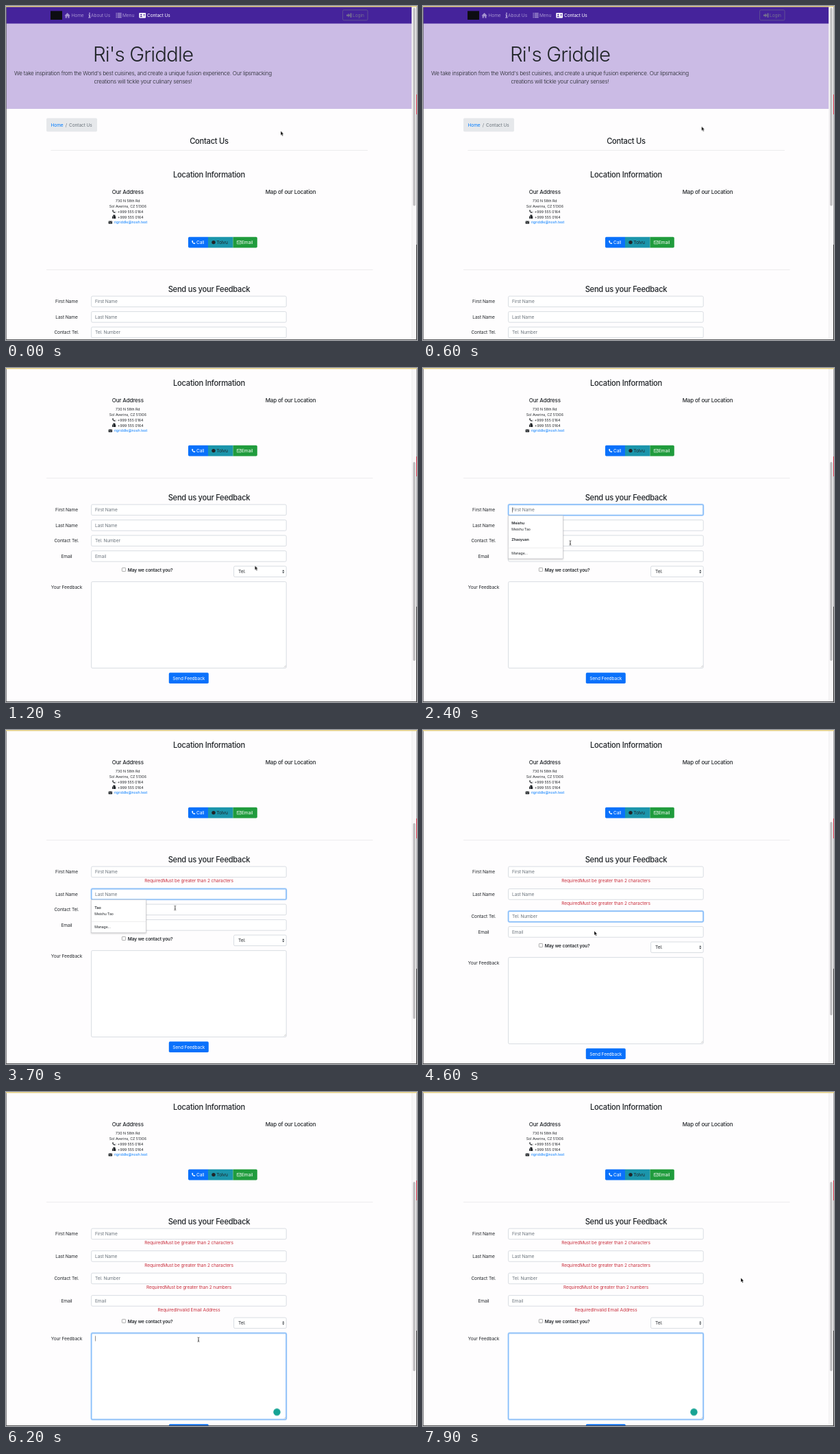
These frames come from a looping animation (600 by 487 pixels, 8000 ms). An HTML page:

```html
<!DOCTYPE html>
<html lang="en">
<head>
<meta charset="utf-8">
<title>Contact form</title>
<style>
html, body { margin: 0; width: 100%; height: 100%; overflow: hidden; background: #fefdfe; }
svg { display: block; width: 600px; height: 487px; }
text { font: 6.6px Inter, Roboto, sans-serif; letter-spacing: -.015em; fill: #212529; white-space: pre; }
.mid { text-anchor: middle; }
.title { font-size: 29.5px; font-weight: 300; letter-spacing: -.03em; }
.lead { font-size: 8.1px; font-weight: 300; letter-spacing: -.03em; }
.h3 { font-size: 11.2px; font-weight: 500; letter-spacing: -.025em; }
.h5 { font-size: 8px; font-weight: 500; letter-spacing: -.02em; }
.small { font-size: 5.25px; letter-spacing: 0; }
.pick { font-size: 5.4px; font-weight: 600; }
.sub { font-size: 5.2px; }
.bold { font-weight: 600; }
.white { fill: #fff; }
.link { fill: #007bff; }
.muted, .hint { fill: #6c757d; }
.nav { fill: #a593d0; }
.login { fill: #75708f; }
.error { fill: #c9303e; text-anchor: middle; }
.line { stroke: #e4e4e6; stroke-width: .7; }
.field, .ring, .glow { x: 124.6px; y: -7.8px; width: 284.6px; height: 15.6px; rx: 1.7px; }
.field, .select { fill: #fff; stroke: #c9cfd6; stroke-width: .7; }
.ring { fill: none; stroke: #80bdff; stroke-width: .8; }
.glow { fill: none; stroke: #007bff; stroke-opacity: .3; stroke-width: 2.2; }
.area { height: 126px; }
.caret { stroke: #444; stroke-width: .6; animation: blink 1s step-end infinite; }
.menu { fill: #fff; stroke: #c4c4c8; stroke-width: .6; filter: drop-shadow(0 1px 1.2px #0003); }

.scroll, .thumb, .s1, .s2, .s3, .s4, .e1, .e2, .e3, .e4, .m1, .m2, .badge, .arrow, .beam {
  animation: 8s step-end infinite;
}
.focus { animation: 8s linear infinite; }
.cursor { animation: move 8s ease-in-out infinite; }
.scroll { animation-name: scroll; }
.thumb { animation-name: thumb; }
.s1 { animation-name: s1; } .e1 { animation-name: e1; }
.s2 { animation-name: s2; } .e2 { animation-name: e2; }
.s3 { animation-name: s3; } .e3 { animation-name: e3; }
.s4 { animation-name: s4; } .e4 { animation-name: e4; }
.m1 { animation-name: m1; } .m2 { animation-name: m2; }
.badge { animation-name: badge; }
.arrow { animation-name: arrow; } .beam { animation-name: beam; }
.f1 { animation-name: f1; } .f2 { animation-name: f2; } .f3 { animation-name: f3; }
.f4 { animation-name: f4; } .f5 { animation-name: f5; }

@keyframes blink { 0% { opacity: 1 } 50%, to { opacity: 0 } }
@keyframes scroll {
  0% { transform: translateY(0) }
  8.75% { transform: translateY(-6px) }
  10% { transform: translateY(-29.2px) }
  11.25%, to { transform: translateY(-224px) }
}
@keyframes thumb {
  0% { y: 2.6px; height: 289px }
  8.75% { y: 6px; height: 289px }
  10% { y: 20px; height: 289px }
  11.25% { y: 137px; height: 290px }
  41.25% { y: 135.7px; height: 285.5px }
  53.75% { y: 134px; height: 282px }
  61.25% { y: 132.5px; height: 279px }
  66.25%, to { y: 131px; height: 276px }
}
/* Each failed field pushes the rows below it down */
@keyframes s1 { 0% { transform: none } 41.25%, to { transform: translateY(10px) } }
@keyframes s2 { 0% { transform: none } 53.75%, to { transform: translateY(10px) } }
@keyframes s3 { 0% { transform: none } 61.25%, to { transform: translateY(10px) } }
@keyframes s4 { 0% { transform: none } 66.25%, to { transform: translateY(10px) } }
@keyframes e1 { 0% { opacity: 0 } 41.25%, to { opacity: 1 } }
@keyframes e2 { 0% { opacity: 0 } 53.75%, to { opacity: 1 } }
@keyframes e3 { 0% { opacity: 0 } 61.25%, to { opacity: 1 } }
@keyframes e4 { 0% { opacity: 0 } 66.25%, to { opacity: 1 } }
@keyframes m1 { 0%, 41.25%, to { opacity: 0 } 25.6% { opacity: 1 } }
@keyframes m2 { 0%, 53.75%, to { opacity: 0 } 42.5% { opacity: 1 } }
@keyframes badge { 0% { opacity: 0 } 70%, to { opacity: 1 } }
@keyframes f1 { 0%, 25%, 43.1%, to { opacity: 0 } 26.9%, 41.25% { opacity: 1 } }
@keyframes f2 { 0%, 41.25%, 55.6%, to { opacity: 0 } 43.1%, 53.75% { opacity: 1 } }
@keyframes f3 { 0%, 53.75%, 63.1%, to { opacity: 0 } 55.6%, 61.25% { opacity: 1 } }
@keyframes f4 { 0%, 61.25%, 68.1%, to { opacity: 0 } 63.1%, 66.25% { opacity: 1 } }
@keyframes f5 { 0%, 66.25% { opacity: 0 } 68.1%, to { opacity: 1 } }
@keyframes move {
  0% { transform: translate(401px, 182.3px) }
  10%, 12.5% { transform: translate(407.5px, 174.6px) }
  17.5% { transform: translate(320px, 400px) }
  23.75%, 26% { transform: translate(196px, 210px) }
  30%, 34% { transform: translate(215px, 255px) }
  40%, 42% { transform: translate(245px, 232px) }
  46.25%, 51% { transform: translate(246.8px, 259.5px) }
  53.75% { transform: translate(249px, 263px) }
  57.5%, 61.5% { transform: translate(250px, 293px) }
  66.25% { transform: translate(266px, 350px) }
  73%, 81% { transform: translate(281px, 361px) }
  91.25% { transform: translate(420px, 292px) }
  98.5%, to { transform: translate(464px, 271px) }
}
@keyframes arrow { 0%, 56%, 83.5%, to { opacity: 1 } 23%, 66.25% { opacity: 0 } }
@keyframes beam { 0%, 56%, 83.5%, to { opacity: 0 } 23%, 66.25% { opacity: 1 } }
</style>
</head>
<body>
<svg viewBox="0 0 600 487">
  <defs>
    <path id="phone" d="M.2 1 1.6.2 2.6 2 1.9 2.8Q2.5 4 3.6 4.5L4.4 3.7 6 4.7 5.2 6Q.7 5.8.2 1z"/>
    <g id="mail"><rect width="6" height="4.6" rx=".6"/><path d="M.3.9 3 2.9 5.7.9" fill="none" stroke="#fff" stroke-width=".5"/></g>
  </defs>
  <rect width="600" height="487" fill="#fefdfe"/>

  <g class="scroll">
    <!-- Navigation -->
    <rect width="592.5" height="26" fill="#45239b"/>
    <rect x="65" y="7.3" width="17" height="12.7" fill="#0d0d12"/>
    <g fill="#a593d0">
      <path d="M85.6 13.9 89.6 10l4 3.9-.5.5-.6-.5v3.5h-2.1v-2.3h-1.6v2.3h-2.1v-3.5l-.6.5z"/>
      <path d="M121 9.8h2v1.6h-2zM120.4 12.3h2.6v4h.7v1.1h-3.5v-1.1h.8v-2.9h-.6z"/>
      <path d="M160.5 10h1.4v1.3h-1.4zm2.2 0h6v1.3h-6zm-2.2 2h1.4v1.3h-1.4zm2.2 0h6v1.3h-6zm-2.2 2h1.4v1.3h-1.4zm2.2 0h6v1.3h-6zm-2.2 2h1.4v1.3h-1.4zm2.2 0h6v1.3h-6z"/>
    </g>
    <rect x="194.3" y="10" width="9.8" height="7.4" rx=".8" fill="#fff"/>
    <g fill="#45239b"><circle cx="197.3" cy="12.7" r="1.1"/><path d="M195.4 15.9q1.9-2.6 3.8 0zM200.4 12h2.5v.8h-2.5zm0 1.7h2.5v.8h-2.5z"/></g>
    <text class="nav" x="95.5" y="16">Home</text>
    <text class="nav" x="124" y="16">About Us</text>
    <text class="nav" x="170" y="16">Menu</text>
    <text class="white" x="206" y="16">Contact Us</text>
    <rect x="491.6" y="5.8" width="36.4" height="15" rx="1.7" fill="none" stroke="#6c6590" stroke-width=".7"/>
    <path d="M497 12.5h2.5v-2l3 3.1-3 3.1v-2H497zM502.5 10.5h2v6.2h-2" fill="#75708f"/>
    <text class="login" x="506" y="16">Login</text>

    <!-- Banner -->
    <rect y="25.6" width="592.5" height="124.4" fill="#cbbbe5"/>
    <text class="title mid" x="200" y="81.3">Ri's Griddle</text>
    <text class="lead mid" x="200" y="100.8">We take inspiration from the World's best cuisines, and create a unique fusion experience. Our lipsmacking</text>
    <text class="lead mid" x="200" y="113.2">creations will tickle your culinary senses!</text>

    <rect x="59" y="163.5" width="74" height="19.8" rx="1.7" fill="#e6e8eb"/>
    <text class="link" x="65.5" y="175.9">Home</text>
    <text class="muted" x="86.8" y="175.9">/</text>
    <text class="muted" x="92" y="175.9">Contact Us</text>
    <text class="h3 mid" x="296.5" y="201.3">Contact Us</text>
    <path class="line" d="M65.5 210.5H528"/>

    <!-- Location -->
    <text class="h3 mid" x="296.5" y="249.8">Location Information</text>
    <text class="h5 mid" x="177.8" y="274.3">Our Address</text>
    <text class="h5 mid" x="415.5" y="274.3">Map of our Location</text>
    <text class="small mid" x="177.8" y="285.5">730 N 58th Rd</text>
    <text class="small mid" x="177.8" y="293.5">Sol Averins, CZ 51306</text>
    <g fill="#212529">
      <use href="#phone" transform="translate(155 297) scale(.8)"/>
      <path d="M155 306.5h1v3.5h-1zM156.4 304.6h3v1.9h.7v3.5h-3.7z"/>
      <use href="#mail" transform="translate(149.6 313.4) scale(.9)"/>
    </g>
    <text class="small" x="159.8" y="301.5">: +999 555 0164</text>
    <text class="small" x="160" y="309.5">: +999 555 0164</text>
    <text class="small" x="155" y="317.4">:</text>
    <text class="small link" x="157.8" y="317.4">rigriddle@nosh.test</text>

    <path d="M267.7 336.7H295v15.8h-27.3q-1.7 0-1.7-1.7v-12.4q0-1.7 1.7-1.7z" fill="#0a71fb"/>
    <path d="M295 336.7h36.5v15.8H295z" fill="#1b95ab"/>
    <path d="M331.5 336.7h33.6q1.7 0 1.7 1.7v12.4q0 1.7-1.7 1.7h-33.6z" fill="#209c3d"/>
    <use href="#phone" transform="translate(271 341.6) scale(.9)" fill="#fff"/>
    <circle cx="303" cy="344.6" r="2.7" fill="#212529"/>
    <path d="M337.3 342.5h5.8v4.4h-5.8zm0 .8 2.9 2 2.9-2" fill="none" stroke="#fff" stroke-width=".6"/>
    <text class="white" x="278" y="347">Call</text>
    <text x="307.3" y="347">Tolvu</text>
    <text class="white" x="344" y="347">Email</text>
    <path class="line" d="M59 384.6H535.500"/>

    <!-- Feedback form -->
    <text class="h3 mid" x="296.5" y="417">Send us your Feedback</text>
    <g transform="translate(0 430.9)">
      <text class="mid" x="88.5" y="2.3">First Name</text>
      <rect class="field"/>
      <text class="hint" x="130" y="2.3">First Name</text>
      <g class="focus f1"><rect class="glow"/><rect class="ring"/><path class="caret" d="M130.500-3.800v7.600"/></g>
      <text class="error e1" x="267" y="15.200">RequiredMust be greater than 2 characters</text>
    </g>
    <g class="s1">
      <g transform="translate(0 453.4)">
        <text class="mid" x="88.5" y="2.3">Last Name</text>
        <rect class="field"/>
        <text class="hint" x="130" y="2.3">Last Name</text>
        <g class="focus f2"><rect class="glow"/><rect class="ring"/><path class="caret" d="M130.500-3.800v7.600"/></g>
        <text class="error e2" x="267" y="15.200">RequiredMust be greater than 2 characters</text>
      </g>
      <g class="s2">
        <g transform="translate(0 475.900)">
          <text class="mid" x="88.5" y="2.3">Contact Tel.</text>
          <rect class="field"/>
          <text class="hint" x="130" y="2.3">Tel. Number</text>
          <g class="focus f3"><rect class="glow"/><rect class="ring"/><path class="caret" d="M130.500-3.800v7.600"/></g>
          <text class="error e3" x="267" y="15.200">RequiredMust be greater than 2 numbers</text>
        </g>
        <g class="s3">
          <g transform="translate(0 498.400)">
            <text class="mid" x="88.5" y="2.3">Email</text>
            <rect class="field"/>
            <text class="hint" x="130" y="2.3">Email</text>
            <g class="focus f4"><rect class="glow"/><rect class="ring"/><path class="caret" d="M130.500-3.800v7.600"/></g>
            <text class="error e4" x="267" y="15.200">RequiredInvalid Email Address</text>
          </g>
          <g class="s4">
            <rect x="169.400" y="515.400" width="5.200" height="5.200" rx=".8" fill="#fff" stroke="#767676" stroke-width=".6"/>
            <text class="bold" x="177.800" y="520.500">May we contact you?</text>
            <rect class="select" x="332.600" y="513" width="76.600" height="15.600" rx="1.700"/>
            <text x="339" y="523.200" fill="#495057">Tel.</text>
            <path d="M403.200 520.200l1.600-2 1.600 2zm0 1.300 1.600 2 1.600-2z" fill="#343a40"/>
            <text class="mid" x="88.5" y="545.800">Your Feedback</text>
            <g transform="translate(0 543.400)">
              <rect class="field area"/>
              <path d="M405.800 117l2.800-2.800m-1.200 2.800 1.200-1.200" stroke="#888" stroke-width=".4"/>
              <g class="focus f5"><rect class="glow area"/><rect class="ring area"/><path class="caret" d="M130.500-3.800v7.600"/></g>
              <circle class="badge" cx="395.500" cy="107.200" r="5.200" fill="#16a394"/>
            </g>
            <rect x="237.800" y="668.300" width="58" height="15.700" rx="1.700" fill="#0a71fb"/>
            <text class="white mid" x="266.800" y="678.600">Send Feedback</text>
          </g>
        </g>
      </g>
    </g>

    <!-- Autofill menus -->
    <g class="m1">
      <rect class="menu" x="124.300" y="439.200" width="80" height="62.800"/>
      <text class="pick" x="129.300" y="452">Meishu</text>
      <text class="sub" x="129.300" y="461">Meishu Tao</text>
      <text class="pick" x="129.300" y="476.400">Zhaoyuan</text>
      <path class="line" d="M124.500 486.300h79.600"/>
      <text class="sub" x="129.300" y="496">Manage...</text>
    </g>
    <g class="m2">
      <rect class="menu" x="124.300" y="471.700" width="80" height="48"/>
      <text class="pick" x="129.300" y="484.500">Tao</text>
      <text class="sub" x="129.300" y="493.500">Meishu Tao</text>
      <path class="line" d="M124.500 503.300h79.600"/>
      <text class="sub" x="129.300" y="513.300">Manage...</text>
    </g>
  </g>

  <!-- Window edges and scrollbar -->
  <rect x="592.500" width="7" height="487" fill="#f9f8f9"/>
  <path d="M592.700 0v487" stroke="#e6e5e7" stroke-width=".5"/>
  <rect class="thumb" x="594.200" y="2.600" width="3.600" height="289" rx="1.800" fill="#c1c0c2"/>
  <rect x="599" width="1" height="487" fill="#a9a8ac"/>
  <rect x="599" y="129" width="1" height="29" fill="#c9283f"/>
  <rect x="599" y="348" width="1" height="139" fill="#2a2a2c"/>
  <rect width=".8" height="487" fill="#6b6a6e"/>
  <rect y="486.100" width="600" height=".9" fill="#4a4a4c"/>
  <rect width="600" height="1.500" fill="#e6d184"/>

  <g class="cursor">
    <path class="arrow" d="M0 0v6.200l1.400-1.300 1 2.300 1.100-.5-1-2.200h1.900z" fill="#000" stroke="#fff" stroke-width=".4"/>
    <path class="beam" d="M-1.400-3.200Q0-3.200 0-2.300 0-3.200 1.400-3.200M0-2.300v4.600M-1.400 3.200Q0 3.200 0 2.300 0 3.200 1.400 3.200M-.8.900H.8" fill="none" stroke="#222" stroke-width=".7"/>
  </g>
</svg>
</body>
</html>
```
